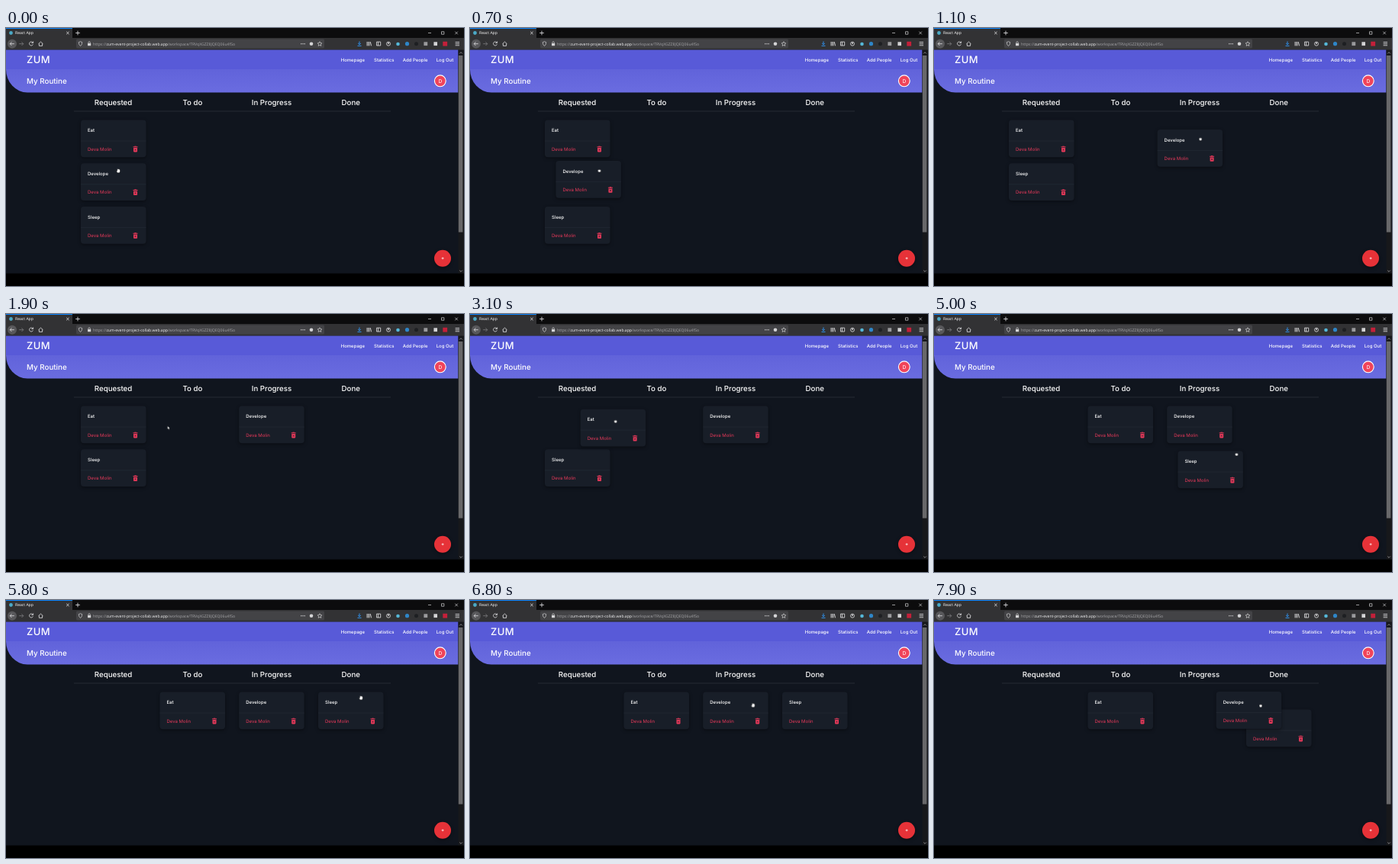
These frames come from a looping animation (600 by 338 pixels, 8 s). An HTML page:

```html
<!DOCTYPE html>
<html lang="en">
<head>
<meta charset="utf-8">
<title>Task board</title>
<style>
html, body { margin: 0; width: 100%; height: 100%; overflow: hidden; background: #000; }
#stage { position: relative; width: 600px; height: 338px; overflow: hidden; }
svg { position: absolute; left: 0; top: 0; display: block; overflow: visible; text-rendering: geometricPrecision; }
text { font-family: Inter, "Open Sans", sans-serif; fill: #fff; }
.chrome text { font: 5.1px "Open Sans", "Noto Sans", sans-serif; }
.icons { fill: none; stroke: #d4d4d6; stroke-width: .9; }
.title { font-weight: 500; }
.nav text { font-size: 6px; font-weight: 500; }
.heads text { font-size: 9.7px; font-weight: 500; text-anchor: middle; }
.card { width: 86px; height: 49px; animation: 8s linear infinite; }
.card text { font-size: 6px; font-weight: 500; }
.owner { font-size: 6px; fill: #e8395a; }
#sleep { z-index: 1; animation-name: sleep, lift; animation-timing-function: linear, step-end; }
#eat { z-index: 2; animation-name: eat; }
#develope { z-index: 3; animation-name: develope; }
#cursor { z-index: 9; width: 8px; height: 8px; animation: pointer 8s linear infinite; }
#cursor path { fill: #fff; stroke: #05070a; stroke-width: .5; animation: 8s step-end infinite; }
#cursor .hand { animation-name: hand; }
#cursor .fist { animation-name: fist; }
#cursor .arrow { animation-name: arrow; }

@keyframes develope {
  0%, 7.5% { transform: translate(98px, 177.2px); }
  8.75% { transform: translate(112px, 174px); }
  13.75% { transform: translate(292.5px, 133px); }
  16.25%, 17.5% { transform: translate(312px, 127px); }
  21.25%, 95% { transform: translate(305.2px, 120.5px); }
  96.25% { transform: translate(312px, 120.5px); }
  97.5% { transform: translate(337px, 120.3px); }
  98.75%, 100% { transform: translate(369.7px, 120px); }
}
@keyframes sleep {
  0%, 11.25% { transform: translate(98px, 233.9px); }
  13.75%, 40% { transform: translate(98px, 177.2px); }
  43.1%, 58.75% { transform: translate(98px, 120.5px); }
  62.5% { transform: translate(319px, 179.7px); }
  65% { transform: translate(400px, 150px); }
  67.5% { transform: translate(431px, 126px); }
  71.25%, 97.25% { transform: translate(409px, 120.5px); }
  98.75%, 100% { transform: translate(409px, 143.5px); }
}
@keyframes lift {
  0% { z-index: 1; }
  57% { z-index: 5; }
  72%, 100% { z-index: 1; }
}
@keyframes eat {
  0%, 35% { transform: translate(98px, 120.5px); }
  40% { transform: translate(160px, 126px); }
  42.5% { transform: translate(236px, 127px); }
  46.25% { transform: translate(203px, 120.6px); }
  47.5%, 100% { transform: translate(201.5px, 120.5px); }
}
@keyframes pointer {
  0%, 1.25% { transform: translate(147px, 187px); }
  3.75%, 7.5% { transform: translate(155px, 190px); }
  8.75% { transform: translate(169px, 187px); }
  13.75% { transform: translate(349px, 145.5px); }
  16.25%, 17.5% { transform: translate(369px, 140px); }
  23.75% { transform: translate(213px, 149px); }
  27.5%, 35% { transform: translate(144px, 136.5px); }
  40% { transform: translate(206px, 142px); }
  42.5% { transform: translate(282px, 143px); }
  46.25% { transform: translate(254px, 141px); }
  50% { transform: translate(215px, 146px); }
  53.75%, 57.5% { transform: translate(135px, 148px); }
  58.75% { transform: translate(175px, 125px); }
  62.5% { transform: translate(396px, 184px); }
  65% { transform: translate(477px, 154px); }
  67.5% { transform: translate(508px, 130px); }
  72.5% { transform: translate(465px, 128px); }
  78.75% { transform: translate(390px, 136px); }
  87.5%, 95% { transform: translate(363px, 138.5px); }
  96.25% { transform: translate(370px, 138.5px); }
  97.5% { transform: translate(395px, 138.5px); }
  98.75%, 100% { transform: translate(428px, 138.5px); }
}
@keyframes hand {
  0%, 26.25%, 51.25%, 71.9% { visibility: visible; }
  6.25%, 33.75%, 58.1%, 95%, 100% { visibility: hidden; }
}
@keyframes fist {
  0%, 17.5%, 42.5%, 67.5% { visibility: hidden; }
  6.25%, 33.75%, 58.1%, 95%, 100% { visibility: visible; }
}
@keyframes arrow {
  0%, 26.25%, 51.25%, 71.9%, 100% { visibility: hidden; }
  17.5%, 42.5%, 67.5% { visibility: visible; }
}
</style>
</head>
<body>
<div id="stage">
  <svg width="600" height="338" viewBox="0 0 600 338">
    <defs>
      <linearGradient id="band" x2="0" y2="1">
        <stop stop-color="#6163da"/><stop offset="1" stop-color="#6a6ce0"/>
      </linearGradient>
      <filter id="shade" x="-20%" y="-20%" width="140%" height="150%" color-interpolation-filters="sRGB">
        <feDropShadow dx="0" dy="1.5" stdDeviation="2" flood-color="#000" flood-opacity=".4"/>
      </filter>
      <g id="card">
        <rect width="85.5" height="48.8" rx="4" fill="#181e28" filter="url(#shade)"/>
        <path d="M0 27.5H85.5" stroke="#252c37" stroke-width=".6"/>
        <text class="owner" x="9" y="40.3">Deva Molin</text>
        <path d="M68.5 35.3h6M70.3 34.7h2.4" stroke="#e8395a"/>
        <path d="M69 36.5h5v4.6q0 .8-.8.8h-3.4q-.8 0-.8-.8z" fill="#e8395a"/>
        <path d="M70.5 38l2 2.2M72.5 38l-2 2.2" stroke="#181e28" stroke-width=".6"/>
      </g>
    </defs>

    <!-- browser frame -->
    <g class="chrome">
      <rect width="600" height="13" fill="#0c0c0d"/>
      <rect width="87" height="13" fill="#323234"/>
      <rect width="87" height="1" fill="#0a84ff"/>
      <rect y="13" width="600" height="16" fill="#323234"/>
      <circle cx="6.5" cy="6.5" r="2.4" fill="#4aa9c6"/>
      <text x="12" y="8.4">React App</text>
      <rect x="92" y="14.5" width="325" height="12" rx="1.5" fill="#434346"/>
      <circle cx="8" cy="20.7" r="6" fill="#58585b"/>
      <text x="114" y="22.6" style="fill:#a6a6a9">https://<tspan fill="#f4f4f5">zum-event-project-collab.web.app</tspan>/workspace/TRVqXGZZ8JQEQ06u4fSo</text>
      <g class="icons">
        <path d="M79.2 4.8l3.4 3.4m0-3.4l-3.4 3.4M91.2 6.5h5.6M94 3.7v5.6"/>
        <path d="M553 6.5h4M570.5 4.8h3.4v3.4h-3.4zM588.3 4.7l3.6 3.6m0-3.6l-3.6 3.6" stroke-width=".7"/>
        <path d="M10.8 20.7H5.2m2.3-2.3l-2.3 2.3 2.3 2.3"/>
        <path d="M17.2 20.7h5.6m-2.3-2.3l2.3 2.3-2.3 2.3" stroke="#77777a"/>
        <path d="M35.2 19.2a2.5 2.5 0 1 0 .2 2.2M35.6 17.5v2.1h-2.2M42.5 20.8l3-2.7 3 2.7M43.4 20.4v3h4.2v-3"/>
        <path d="M95.3 18.6l2.2-.8 2.2.8q.1 3.6-2.2 5-2.3-1.4-2.2-5zM107.8 20v-.8a1.3 1.3 0 0 1 2.6 0v.8" stroke-width=".7"/>
        <path d="M411 17.8l.9 1.9 2 .2-1.5 1.4.4 2.1-1.8-1-1.8 1 .4-2.1-1.5-1.4 2-.2z" stroke-width=".7"/>
        <path d="M463 17.5v4.2m-1.8-1.7l1.8 1.8 1.8-1.8M460.5 23.4h5" stroke="#2f9bff"/>
        <path d="M473 18v5.4m1.6-5.4v5.4m1.6-5.4v5.4m1.1-5.2l1.4 5.2M485.5 18.2h5.2v4.8h-5.2zm2 0v4.8"/>
        <circle cx="501" cy="20.7" r="2.5"/>
        <path d="M588.6 18.6h5.4m-5.4 2.1h5.4m-5.4 2.1h5.4"/>
      </g>
      <g fill="#d4d4d6">
        <rect x="107" y="20" width="4.2" height="3.2" rx=".5"/>
        <circle cx="386.8" cy="20.7" r=".7"/><circle cx="389" cy="20.7" r=".7"/><circle cx="391.2" cy="20.7" r=".7"/>
        <circle cx="400" cy="20.7" r="2.3"/>
        <circle cx="501" cy="20" r="1"/>
        <rect x="547.4" y="18.3" width="4.8" height="4.8" fill="#9a9a9d"/>
        <rect x="560.4" y="18.3" width="4.6" height="4.8"/>
      </g>
      <circle cx="513.5" cy="21" r="2.3" fill="#55b8d8"/>
      <circle cx="525.5" cy="20.7" r="2.6" fill="#2e86c8"/>
      <circle cx="537.5" cy="20.7" r="2.5" fill="#1d1f22"/>
      <rect x="572.3" y="17.8" width="5.8" height="5.8" fill="#c4203a"/>
    </g>

    <!-- page -->
    <rect y="28.6" width="593" height="292.9" fill="#10151e"/>
    <path d="M0 54H592.5V84.5H28A28 30.5 0 0 1 0 54z" fill="url(#band)"/>
    <rect y="28.6" width="592.5" height="25.4" fill="#585ad8"/>
    <text class="title" x="27" y="46.2" font-size="13" letter-spacing=".4">ZUM</text>
    <text class="title" x="27" y="73.3" font-size="9.8">My Routine</text>
    <g class="nav">
      <text x="438.7" y="43.7">Homepage</text>
      <text x="482" y="43.7">Statistics</text>
      <text x="519.7" y="43.7">Add People</text>
      <text x="563.7" y="43.7">Log Out</text>
    </g>
    <circle cx="568.8" cy="69.3" r="7.4" fill="#f0445a" stroke="#fff" stroke-width="1.1"/>
    <text x="568.8" y="71.7" font-size="6.6" text-anchor="middle">D</text>
    <g class="heads">
      <text x="140.6" y="100.5">Requested</text>
      <text x="244.4" y="100.5">To do</text>
      <text x="348" y="100.5">In Progress</text>
      <text x="451.8" y="100.5">Done</text>
    </g>
    <path d="M89 109H504" stroke="#2b303a" stroke-width=".8"/>
    <circle cx="572" cy="301.7" r="11" fill="#e63238" filter="url(#shade)"/>
    <path d="M570.6 301.7h3m-1.5-1.5v3" stroke="#fff" stroke-width=".7"/>

    <!-- scrollbar -->
    <rect x="592.5" y="28.6" width="7.5" height="292.9" fill="#17181b"/>
    <rect x="592.8" y="36" width="5.6" height="231.5" fill="#68686a"/>
    <path d="M594.2 33.5l1.8-1.8 1.8 1.8M594.2 317.5l1.8 1.8 1.8-1.8" fill="none" stroke="#a0a0a2" stroke-width=".8"/>
  </svg>

  <svg class="card" id="sleep"><use href="#card"/><text x="9" y="15.7">Sleep</text></svg>
  <svg class="card" id="eat"><use href="#card"/><text x="9" y="15.7">Eat</text></svg>
  <svg class="card" id="develope"><use href="#card"/><text x="9" y="15.7">Develope</text></svg>

  <svg id="cursor">
    <path class="hand" d="M-1.2 2.8L-2.5 .3q.2-.8 1 0L-1.5-2q.6-.8 1.1 0 .5-1 1.1 0 .8-.5 1.1.4.7-.1.7.6V1L1.7 2.8z"/>
    <path class="fist" d="M-1.1 2L-2 .3V-.8q.9-1 1.9-.6 1-.4 2 .5V.5L1.2 2z"/>
    <path class="arrow" d="M-1.2-2.4V2.2L-.2 1.3.6 2.9 1.4 2.5.7.9H2.1z"/>
  </svg>
</div>
</body>
</html>
```
